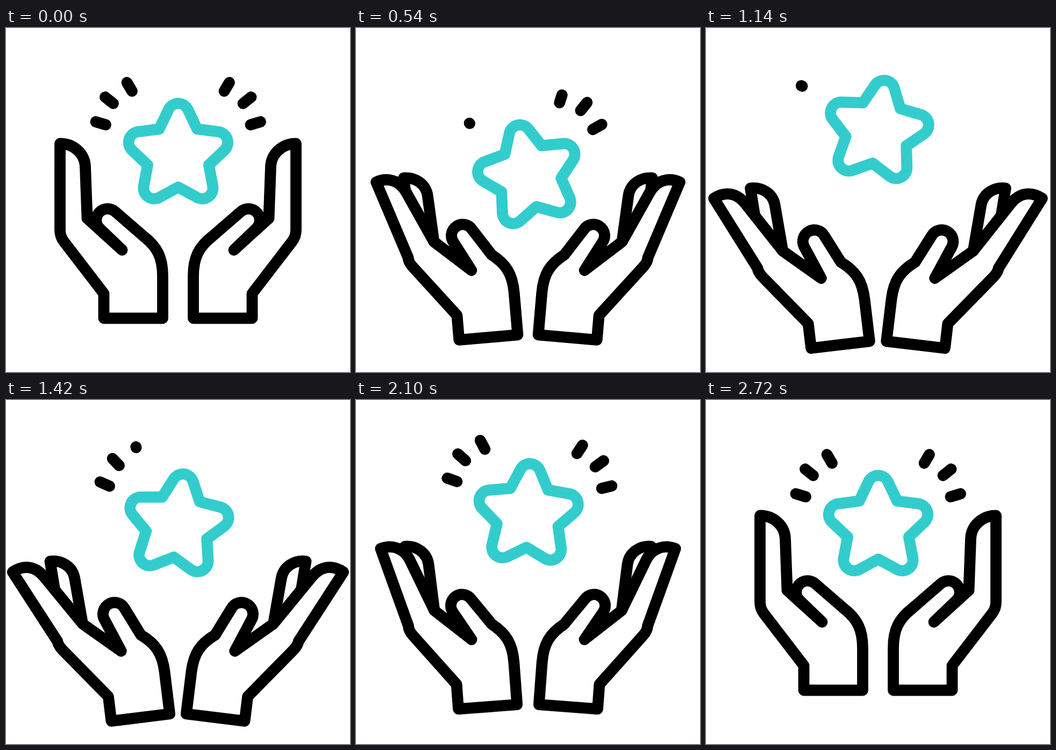
Write an HTML page that moves like this. It is 640 px wide and 640 px high and loops after 3.02 s.

```html
<!DOCTYPE html>
<html lang="en">
<head>
<meta charset="utf-8">
<title>Hands and star</title>
<style>
  html, body { margin: 0; width: 100%; height: 100%; overflow: hidden; background: #fff; }
  svg { display: block; width: 100%; height: 100%; }
  path { fill: none; stroke: #000; stroke-width: 20.8; stroke-linecap: round; stroke-linejoin: round; }
  #front { fill: #fff; }
  #star { stroke: #33cccc; }
</style>
</head>
<body>
<svg viewBox="0 0 640 640">
  <g id="hand">
    <g id="pose">
      <path d="M107 281L105 231C127 231 145 246 146.5 267L151 354"/>
      <path id="front"/>
    </g>
  </g>
  <use href="#hand" transform="matrix(-1 0 0 1 640 0)"/>
  <g id="flight">
    <path id="star"/>
    <g id="sparks"></g>
  </g>
</svg>
<script>
const LOOP = 3020, MOVE = 2720, PEAK = 1560;
const $ = id => document.getElementById(id);
const clamp = v => Math.min(1, Math.max(0, v));
const lerp = (a, b, u) => a + (b - a) * u;

// Timing curve with handles at (x1, 0) and (x2, 1)
function ease(x1, x2) {
  return x => {
    let lo = 0, hi = 1;
    for (let i = 0; i < 24; i++) {
      const s = (lo + hi) / 2, r = 1 - s;
      if (3 * s * r * r * x1 + 3 * s * s * r * x2 + s ** 3 < x) lo = s; else hi = s;
    }
    return lo * lo * (3 - 2 * lo);
  };
}
const opening = ease(.333, .01), closing = ease(.57, .47);
const swing = ease(.333, .667), settle = ease(.333, .333);

// [time, value]
const lift = [[0, 0], [552, 38], [1100, -45], [1620, 17], [2110, -22], [MOVE, 0]];
const tilt = [[0, 0], [700, -15], [1280, 13], [1730, -12], [2180, 4], [MOVE, 0]];

function track(keys, t) {
  const last = keys.length - 1;
  let i = 1;
  while (i < last && t > keys[i][0]) i++;
  const [t0, a] = keys[i - 1], [t1, b] = keys[i];
  return lerp(a, b, (i === last ? settle : swing)(clamp((t - t0) / (t1 - t0))));
}

// Points that move within the palm: [closed x, y, open x, y]
const joints = {
  tip: [100.5, 215, 33.2, 242.6],
  knuckle: [100.5, 376, 100.8, 381],
  curveA: [126.5, 215, 54.7, 231.2],
  curveB: [146.5, 234, 76.3, 235.9],
  side: [147.5, 258, 90.6, 258.8],
  thumbOut: [203.5, 342, 232, 335],
  thumbIn: [174.5, 373, 192.3, 351]
};

function drawHand(p) {
  const at = {};
  for (const name in joints) {
    const [x, y, u, v] = joints[name];
    at[name] = lerp(x, u, p).toFixed(2) + ' ' + lerp(y, v, p).toFixed(2);
  }
  $('front').setAttribute('d',
    `M${at.tip}L${at.knuckle}C100.5 384 103 391 107.5 397L182 494V540H291.5V462` +
    `C291.5 426 281 407 256 387.5L${at.thumbOut}A1 1 0 0 0 ${at.thumbIn}` +
    `L216 413L151 354L${at.side}C${at.curveB} ${at.curveA} ${at.tip}Z`);
  $('pose').setAttribute('transform',
    `translate(${14 * p} ${57.5 * p}) rotate(${-7 * p} 182 540)`);
}

function starPath(cx, cy) {
  let d = '';
  for (let k = 0; k < 5; k++) {
    const a = k * Math.PI * .4, c = Math.cos(a), s = Math.sin(a);
    const pt = (x, y) => `${cx + x * c - y * s} ${cy + x * s + y * c}`;
    d += `${k ? 'L' : 'M'}${pt(-35.2, -48.4)}L${pt(-18.1, -84.4)}A20 20 0 0 1 ${pt(18.1, -84.4)}`;
  }
  return d + 'Z';
}
$('star').setAttribute('d', starPath(320.4, 236.3));

// Sparks run from outer to inner end, ordered left to right
const left = [[167, 174.5, 185.5, 180], [184.5, 128.5, 199.5, 140.5], [225, 101.5, 234.5, 117.5]];
const right = left.map(([x, y, u, v]) => [640.5 - x, y, 640.5 - u, v]).reverse();
const sparks = [...left, ...right].map(ends => {
  const path = document.createElementNS('http://www.w3.org/2000/svg', 'path');
  $('sparks').append(path);
  return { ends, path };
});

function drawSparks(t) {
  sparks.forEach(({ ends: [x, y, u, v], path }, k) => {
    const from = clamp((t - 84 - 141 * k) / 183);
    const to = clamp((t - 1125 - 142 * k) / 165);
    const [a, b] = t < 1100 ? [from, 1] : [0, to];
    path.setAttribute('d', a < b
      ? `M${lerp(x, u, a)} ${lerp(y, v, a)}L${lerp(x, u, b)} ${lerp(y, v, b)}` : '');
  });
}

function draw(now) {
  const t = Math.min(now % LOOP, MOVE);
  drawHand(t < PEAK ? opening(t / PEAK) : 1 - closing((t - PEAK) / (MOVE - PEAK)));
  $('flight').setAttribute('transform',
    `translate(0 ${track(lift, t)}) rotate(${track(tilt, t)} 320.4 229)`);
  drawSparks(t);
}

const start = performance.now();
function tick() {
  draw(performance.now() - start);
  requestAnimationFrame(tick);
}
tick();
</script>
</body>
</html>
```
